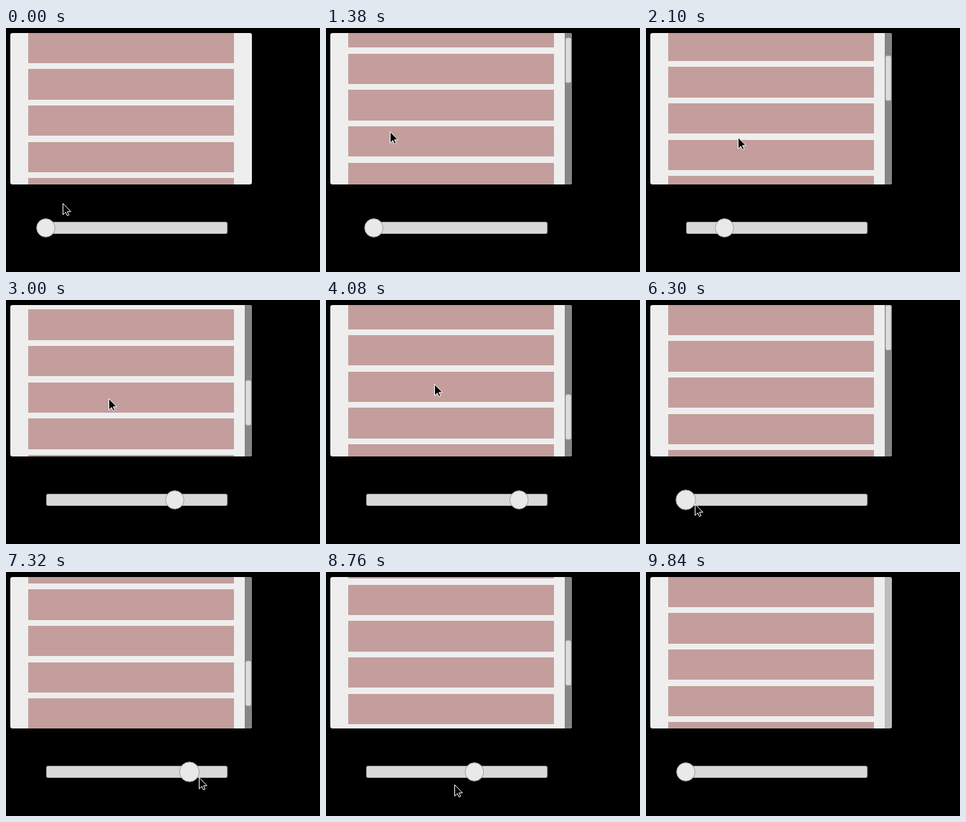
An HTML page with a canvas that plays this animation: 438 px wide and 340 px high, repeating every 9.9 s.

```html
<!DOCTYPE html>
<html>
<head>
<meta charset="utf-8">
<title>Scroll panel with slider</title>
<style>
html, body { margin: 0; width: 100%; height: 100%; overflow: hidden; background: #000; }
canvas { display: block; }
</style>
</head>
<body>
<canvas id="stage" width="438" height="340"></canvas>
<script>
const ctx = document.getElementById('stage').getContext('2d');
const LOOP = 9900, STEP = 60;
const ROWS = 14, PITCH = 50.67, ROW_HEIGHT = 42.3, MAX_SCROLL = 490;

// [time, scroll progress]
const scrollKeys = [
  [900, 0], [2100, .213], [2880, .64], [3600, 1], [3840, 1], [4080, .844], [4140, .835],
  [4320, .835], [5280, .264], [5820, 0], [6300, 0], [7320, .791], [8040, 1], [8460, 1],
  [8760, .598], [9360, 0]
];
// [time, x, y]
const cursorKeys = [
  [0, 79, 244], [600, 71, 139], [900, 71, 139], [2100, 128, 152], [4080, 151, 117],
  [4320, 151, 117], [5280, 153, 120], [6240, 68, 284], [6300, 68, 284], [7320, 269, 286],
  [8280, 334, 285], [8460, 334, 285], [8760, 179, 296], [9420, 45, 314], [9540, 45, 314],
  [9780, 33, 342]
];
const arrow = new Path2D('M.5 .5V16.2L4.2 12.7L6.5 17.6L8.8 16.6L6.6 11.8H11.4Z');

const clamp = v => Math.max(0, Math.min(1, v));

// Monotone cubic interpolation of column c
function sample(keys, t, c = 1) {
  const last = keys.length - 1;
  if (t <= keys[0][0]) return keys[0][c];
  if (t >= keys[last][0]) return keys[last][c];
  const i = keys.findIndex(k => k[0] > t) - 1;
  const slope = j => j < 0 || j >= last ? 0
    : (keys[j + 1][c] - keys[j][c]) / (keys[j + 1][0] - keys[j][0]);
  const tangent = j => {
    const a = slope(j - 1), b = slope(j);
    return a * b > 0 ? 2 * a * b / (a + b) : 0;
  };
  const h = keys[i + 1][0] - keys[i][0], u = (t - keys[i][0]) / h, v = 1 - u;
  return keys[i][c] * (1 + 2 * u) * v * v + keys[i + 1][c] * (3 - 2 * u) * u * u
    + h * u * v * (tangent(i) * v - tangent(i + 1) * u);
}

function box(x, y, w, h, r, fill, stroke) {
  ctx.beginPath();
  ctx.roundRect(x, y, w, h, r);
  ctx.fillStyle = fill;
  ctx.fill();
  if (stroke) {
    ctx.strokeStyle = stroke;
    ctx.stroke();
  }
}

function drawPanel(t, progress) {
  ctx.save();
  box(6, 7, 337, 211, 3, '#eee');
  ctx.clip();
  ctx.fillStyle = '#c39e9d';
  for (let i = 0; i < ROWS; i++) {
    const y = 6.6 + i * PITCH - progress * MAX_SCROLL;
    const top = Math.round(y);
    ctx.fillRect(31, top, 287, Math.round(y + ROW_HEIGHT) - top);
  }
  const shown = clamp((t - 840) / 240);
  ctx.globalAlpha = Math.min(shown, clamp(1 - (t - 9660) / 340));
  box(333, 7, 10, 211, 0, '#868686');
  ctx.globalAlpha = Math.min(shown, clamp(1 - (t - 9600) / 180));
  box(334.5, 7.5 + 147.5 * progress, 7, 62, 2, '#dcdcdc', '#c8c8c8');
  ctx.restore();
}

function drawSlider(progress, x, y) {
  const handle = 55.5 + 253.3 * progress;
  const hover = Math.hypot(x - handle, y - 278.5) < 16.5;
  box(56.5, 270.5, 252, 16, 2, '#d8d8d8', '#a0a0a0');
  const r = hover ? 13.7 : 12.8;
  box(handle - r, 278.5 - r, 2 * r, 2 * r, r, '#e9e9e9', '#a0a0a0');
}

function drawCursor(x, y) {
  ctx.save();
  ctx.translate(Math.round(x), Math.round(y));
  ctx.fillStyle = '#000';
  ctx.fill(arrow);
  ctx.strokeStyle = '#fff';
  ctx.stroke(arrow);
  ctx.restore();
}

function draw(now) {
  const t = Math.floor(now % LOOP / STEP) * STEP;
  const progress = sample(scrollKeys, t);
  const x = sample(cursorKeys, t, 1), y = sample(cursorKeys, t, 2);
  ctx.clearRect(0, 0, 438, 340);
  drawPanel(t, progress);
  drawSlider(progress, x, y);
  drawCursor(x, y);
}

const start = performance.now();
function loop() {
  draw(performance.now() - start);
  requestAnimationFrame(loop);
}
loop();
</script>
</body>
</html>
```
